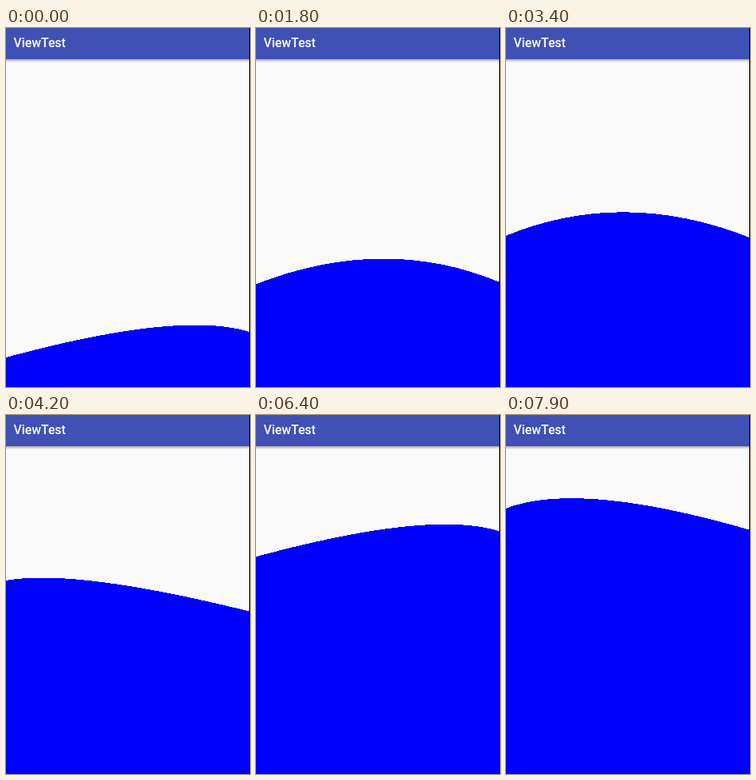
Recreate the animation shown at these times as an HTML page. Size 306x449 px, loop 8 s.

```html
<!DOCTYPE html>
<html lang="en">
<head>
<meta charset="utf-8">
<title>ViewTest</title>
<style>
  html, body { margin: 0; width: 100%; height: 100%; overflow: hidden; background: #fafafa; }
  svg { display: block; width: 306px; height: 449px; }
  text { font: 500 15.8px Roboto, sans-serif; fill: #fff; }
</style>
</head>
<body>
<svg viewBox="0 0 306 449">
  <defs>
    <linearGradient id="shade" x2="0" y2="1">
      <stop offset="0" stop-color="#000" stop-opacity=".32"/>
      <stop offset="1" stop-color="#000" stop-opacity="0"/>
    </linearGradient>
  </defs>
  <rect width="306" height="449" fill="#fafafa"/>
  <path id="wave" fill="#00f" shape-rendering="crispEdges"/>
  <rect y="39" width="306" height="4" fill="url(#shade)"/>
  <rect width="306" height="39" fill="#3f51b5"/>
  <text x="9.5" y="24">ViewTest</text>
  <rect x="305" width="1" height="449" fill="#000"/>
</svg>
<script>
  const LOOP = 8000, TICK = 100, SPAN = 900;
  const MID = 152.5, HALF = 206, RISE = 55.7;
  const START = 371.5, TOP = 100;      // crest height at the start and at its turn
  const SWING = 111.5, RATE = 3.8;     // sideways reach, and sideways travel per pixel of rise
  const travel = [0, 44.3, 83, 117.3, 148, 178, 206, 232, 257, 281];
  const wave = document.getElementById('wave');

  function distance(t) {
    const i = Math.floor(t / SPAN);
    return travel[i] + (travel[i + 1] - travel[i]) * (t / SPAN - i);
  }

  // Triangle wave that begins at 85 and heads left
  function sway(q) {
    const phase = (q * RATE + SWING - 85) % (4 * SWING);
    return Math.abs(phase - 2 * SWING) - SWING;
  }

  function draw() {
    const t = Math.floor(performance.now() % LOOP / TICK) * TICK;
    const q = distance(t);
    const crest = TOP + Math.abs(START - q - TOP);
    const x = MID + 2 * sway(q);
    const base = crest + RISE;
    wave.setAttribute('d',
      `M${MID - HALF} ${base}Q${x} ${crest - RISE} ${MID + HALF} ${base}V600H${MID - HALF}Z`);
    requestAnimationFrame(draw);
  }
  draw();
</script>
</body>
</html>
```
